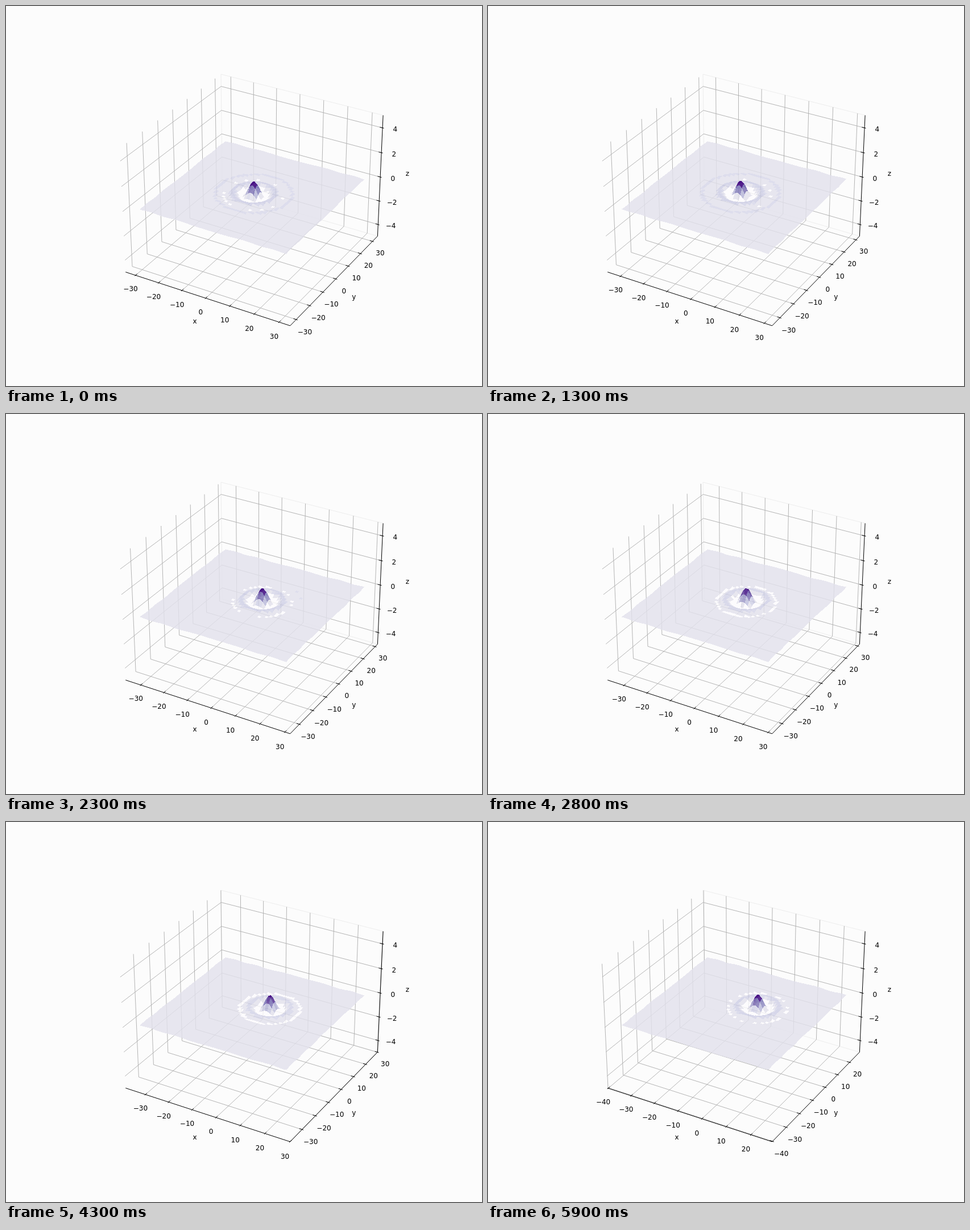
These frames come from a looping animation (837 px wide and 669 px high, 6 s). An HTML page with a canvas:

```html
<!DOCTYPE html>
<html lang="en">
<head>
<meta charset="utf-8">
<title>Drifting ripple surface</title>
<style>
html, body { margin: 0; width: 100%; height: 100%; overflow: hidden; background: #fcfcfc; }
canvas { display: block; }
</style>
</head>
<body>
<canvas id="stage" width="837" height="669"></canvas>
<script>
const canvas = document.getElementById("stage");
const ctx = canvas.getContext("2d", { willReadFrequently: true });
const W = canvas.width, H = canvas.height;

const FRAMES = 60, FRAME_MS = 100, DRIFT = 0.1;
const DATA_HALF = 30, VIEW_HALF = 34.375, Z_HALF = 5;

// Perspective camera: elevation 30, azimuth -60, distance 10.
const CX = 435.92, CY = 330.88, SCALE = 2784.5, DIST = 10;
const BOX_XY = 0.59524, BOX_Z = 0.44643;
const depth = (x, y, z) =>
  DIST - (0.433013 * x - 0.75 * y) * BOX_XY - 0.5 * z * BOX_Z;

// Box coordinates run from -1 to 1 on each axis.
function project(x, y, z) {
  const k = SCALE / depth(x, y, z);
  return [
    CX + k * (0.866025 * x + 0.5 * y) * BOX_XY,
    CY - k * ((0.433013 * y - 0.25 * x) * BOX_XY + 0.866025 * z * BOX_Z)
  ];
}

function line3d(color, width, ...points) {
  ctx.strokeStyle = color;
  ctx.lineWidth = width;
  ctx.beginPath();
  for (const p of points) ctx.lineTo(...project(...p));
  ctx.stroke();
}

function label(text, x, baseline) {
  ctx.fillStyle = "#000";
  ctx.fillText(text, x, baseline);
}

function tickLabel(value, at, dx, dy) {
  const [x, y] = project(...at);
  label(String(value).replace("-", "\u2212"), x + dx, y + dy + 4.4);
}

const TICK_IN = 0.032, TICK_OUT = 0.016;
const grid = (...points) => line3d("#b0b0b0", 0.95, ...points);
const black = (...points) => line3d("#000", 1, ...points);

function drawAxes(shift) {
  const ticks = [];
  for (let v = -40; v <= 40; v += 10) {
    const t = (v + shift) / VIEW_HALF;
    if (Math.abs(t) <= 1) ticks.push([v, t]);
  }
  const zTicks = [-4, -2, 0, 2, 4].map(v => [v, v / Z_HALF]);

  line3d("#ededed", 0.95, [1, 1, -1], [-1, 1, -1], [-1, 1, 1], [1, 1, 1]);

  for (const [, t] of ticks) {
    grid([t, 1, 1], [t, 1, -1], [t, -1, -1]);
    grid([-1, t, 1], [-1, t, -1], [1, t, -1]);
  }
  for (const [, t] of zTicks) grid([-1, -1, t], [-1, 1, t], [1, 1, t]);

  black([-1, -1, -1], [1, -1, -1], [1, 1, -1], [1, 1, 1]);

  ctx.font = '12px "DejaVu Sans", sans-serif';
  ctx.textAlign = "center";
  for (const [v, t] of ticks) {
    black([t, -1 + TICK_IN, -1], [t, -1 - TICK_OUT, -1]);
    black([1 - TICK_IN, t, -1], [1 + TICK_OUT, t, -1]);
    tickLabel(v, [t, -1, -1], -8.8, 24.6 + 0.8 * t);
    tickLabel(v, [1, t, -1], 14.4 - 0.9 * t, 20.8 - 0.8 * t);
  }
  for (const [v, t] of zTicks) {
    black([1 - TICK_IN, 1, t], [1 + TICK_OUT, 1, t]);
    tickLabel(v, [1, 1, t], 22.3, 2.3);
  }
  label("x", 332, 558.5);
  label("y", 611.7, 515.5);
  label("z", 706, 298.5);
}

const PURPLES = [
  [252, 251, 253], [239, 237, 245], [218, 218, 235], [188, 189, 220],
  [158, 154, 200], [128, 125, 186], [106, 81, 163], [84, 39, 143], [63, 0, 125]
];
const FLAT = [226, 225, 236];
const WHITE_BELOW = 0.1095, FLAT_BELOW = 0.2405, ALPHA = 0.8;

function purple(n) {
  const s = Math.min(Math.max(n, 0), 1) * 8;
  const i = Math.min(Math.floor(s), 7);
  return PURPLES[i].map((c, k) => c + (PURPLES[i + 1][k] - c) * (s - i));
}

// Low heights collapse to two flat tones.
function surfaceColor(n) {
  if (n < WHITE_BELOW) return PURPLES[0];
  if (n < FLAT_BELOW) return FLAT;
  return purple(n + 0.03 * (1 - n));
}

const SAMPLES = 500, STRIDE = 10, EDGE_STEPS = 5;
const knots = [];
for (let i = 0; i < SAMPLES - 1; i += STRIDE) knots.push(i);
knots.push(SAMPLES - 1);
const knotPos = knots.map(i => -DATA_HALF + i * 2 * DATA_HALF / (SAMPLES - 1));

function ripple(x, y) {
  const r = Math.hypot(x, y);
  return r < 1e-9 ? 1 : Math.sin(r) / r;
}

function makeFacet(x0, x1, y0, y1, shift) {
  const corners = [[x0, y0], [x1, y0], [x1, y1], [x0, y1]];
  const points = [];
  let sum = 0;
  corners.forEach(([ax, ay], i) => {
    const [bx, by] = corners[(i + 1) % 4];
    for (let s = 0; s < EDGE_STEPS; s++) {
      const x = ax + (bx - ax) * s / EDGE_STEPS;
      const y = ay + (by - ay) * s / EDGE_STEPS;
      const z = ripple(x - shift, y - shift);
      sum += z;
      points.push(project(x / VIEW_HALF, y / VIEW_HALF, z / Z_HALF));
    }
  });
  const mean = sum / points.length;
  const mid = (a, b) => (a + b) / 2 / VIEW_HALF;
  return { points, mean, depth: depth(mid(x0, x1), mid(y0, y1), mean / Z_HALF) };
}

// Hard-edged polygon fill, so that translucent neighbours leave no seams.
function fillPolygon(pixels, points, color) {
  let top = Infinity, bottom = -Infinity;
  for (const [, y] of points) {
    top = Math.min(top, y);
    bottom = Math.max(bottom, y);
  }
  for (let row = Math.ceil(top - 0.5); row + 0.5 < bottom; row++) {
    const y = row + 0.5, hits = [];
    let [px, py] = points[points.length - 1];
    for (const [qx, qy] of points) {
      if ((py <= y) !== (qy <= y)) hits.push(px + (qx - px) * (y - py) / (qy - py));
      px = qx;
      py = qy;
    }
    hits.sort((a, b) => a - b);
    for (let i = 0; i + 1 < hits.length; i += 2) {
      for (let x = Math.ceil(hits[i] - 0.5); x + 0.5 < hits[i + 1]; x++) {
        const o = (row * W + x) * 4;
        for (let c = 0; c < 3; c++) {
          pixels[o + c] += (color[c] - pixels[o + c]) * ALPHA;
        }
      }
    }
  }
}

function drawSurface(shift) {
  const facets = [];
  let low = Infinity, high = -Infinity;
  for (let i = 0; i + 1 < knotPos.length; i++) {
    for (let j = 0; j + 1 < knotPos.length; j++) {
      const facet = makeFacet(knotPos[i], knotPos[i + 1], knotPos[j], knotPos[j + 1], shift);
      low = Math.min(low, facet.mean);
      high = Math.max(high, facet.mean);
      facets.push(facet);
    }
  }
  facets.sort((a, b) => b.depth - a.depth);

  const image = ctx.getImageData(0, 0, W, H);
  for (const f of facets) {
    fillPolygon(image.data, f.points, surfaceColor((f.mean - low) / (high - low)));
  }
  ctx.putImageData(image, 0, 0);
}

function draw(frame) {
  const shift = frame * DRIFT;
  ctx.fillStyle = "#fcfcfc";
  ctx.fillRect(0, 0, W, H);
  drawAxes(shift);
  drawSurface(shift);
}

let shown = -1;
function tick() {
  const frame = Math.floor(performance.now() / FRAME_MS) % FRAMES;
  if (frame !== shown) {
    shown = frame;
    draw(frame);
  }
  requestAnimationFrame(tick);
}
tick();
</script>
</body>
</html>
```
